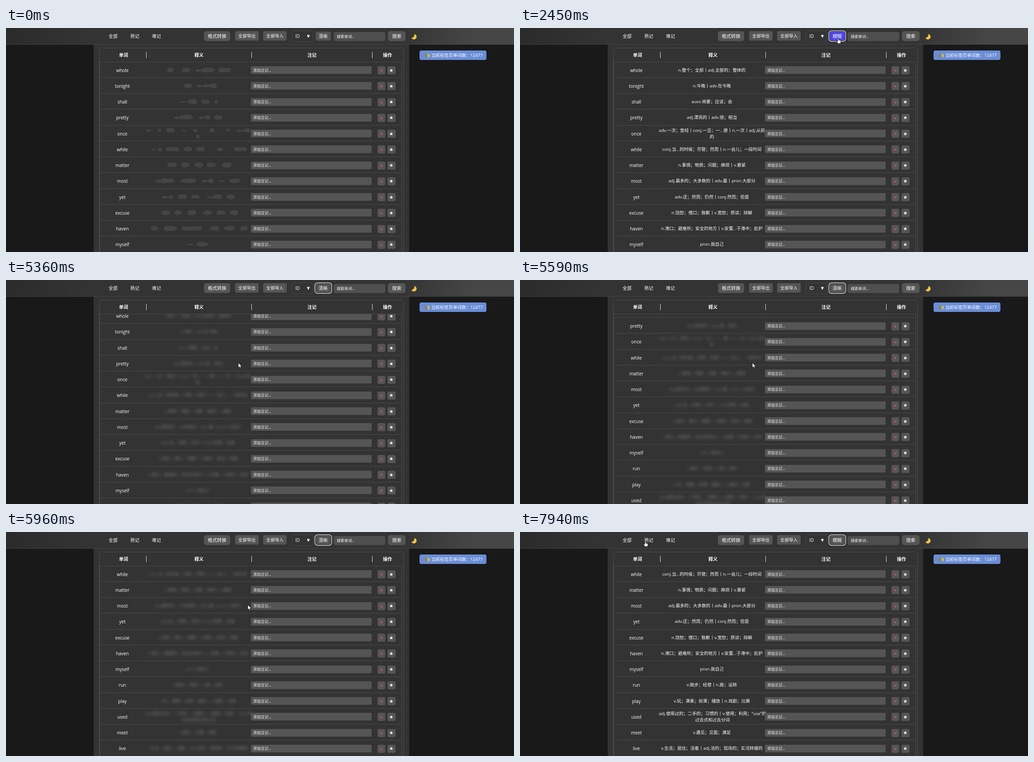
An HTML page that plays this animation: 1124x498 px, repeating every 8000 ms.

```html
<!DOCTYPE html>
<html lang="zh-CN">
<head>
<meta charset="utf-8">
<title>单词本</title>
<style>
html, body { margin: 0; width: 100%; height: 100%; overflow: hidden; background: #191919; }
#stage { position: relative; width: 1124px; height: 498px; overflow: hidden; background: #191919;
  color: #fff; font: 10px/14px "Open Sans", "Noto Sans CJK SC", "Noto Sans CJK JP", sans-serif; }
#stage div { position: absolute; box-sizing: border-box; display: grid; place-items: center; white-space: pre; }
#stage .nav { background: linear-gradient(100deg, #2b2b2b, #333 16%, #343434 78%, #464646 92%); border-bottom: 1px solid #454545; }
#stage .link { cursor: pointer; }
#stage .btn { background: #555; border-radius: 3px; cursor: pointer; }
#stage .big { border-radius: 5px; font-size: 10.3px; }
#stage .small { font-size: 9.6px; }
#stage .select { border: 1px solid #474747; border-radius: 3px; }
#stage .input { background: #555; border-radius: 2px; font-size: 8.3px; justify-items: start; padding-left: 5.5px; cursor: text; }
#stage .search { background: #4f4f4f; border-radius: 4px; padding-left: 7px; }
#stage .th { font-weight: bold; }
#stage .sep { background: #ddd; }
#stage .frame { border: 1px solid #4c4c4c; border-radius: 6px 6px 0 0; }
#stage .list { overflow: hidden; border: solid #4c4c4c; border-width: 1px 1px 0; }
#stage .row { border-bottom: 1px solid #4a4a4a; }
#stage .word { font-size: 9.9px; }
#stage .def { font-size: 9.6px; text-align: center; }
.def span { padding: 3px 0; cursor: pointer; filter: var(--veil); }
#stage .del { color: #f4547c; font-size: 12px; line-height: 20px; }
#stage .star { font: 11px/17px "DejaVu Sans", sans-serif; }
#stage .badge { background: #6a8ed6; border-radius: 4px; }
#stage .tip { background: #2b2b2b; border: 1px solid #555; border-radius: 2px; font-size: 8.2px; line-height: 12px; pointer-events: none; }
#stage .toggle { border-radius: 4px; }
#stage .toggle.focus { box-shadow: 0 0 0 1px #222, 0 0 0 2.2px #f4f4f4; }
#stage .toggle.hover { background: #5048e5; }
svg { position: absolute; left: 0; top: 0; pointer-events: none; }
</style>
</head>
<body>
<div id="stage"></div>
<svg width="1124" height="498">
  <defs>
    <filter id="flat" x="-20%" y="-60%" width="140%" height="220%" color-interpolation-filters="sRGB">
      <feGaussianBlur stdDeviation="3.6"/>
      <feComponentTransfer><feFuncA type="discrete" tableValues="0 0 0 .083 .083 .083 .083 .083 .083 .083 .083 .083 .083 .083 .083 .083 .083 .083 .083 .083"/></feComponentTransfer>
    </filter>
    <filter id="bands" x="-20%" y="-60%" width="140%" height="220%" color-interpolation-filters="sRGB">
      <feGaussianBlur stdDeviation="3.6"/>
      <feComponentTransfer><feFuncA type="discrete" tableValues="0 .02 .035 .055 .075 .095 .1 .1 .1 .1 .1 .1 .1 .1 .1 .1 .1 .1 .1 .1"/></feComponentTransfer>
    </filter>
  </defs>
  <path fill="#fcc63c" d="M903.5 13.5a6 6 0 1 1 -6.5 8.5a7 7 0 0 0 6.5 -8.5z"/>
  <g transform="rotate(-6 932 61)">
    <path fill="#d9534f" d="M927.5 57h3v8h-3z"/>
    <path fill="#5fb878" d="M930.5 56h3.5v9h-3.5z"/>
    <path fill="#e8c468" d="M934 58h3v7h-3z"/>
  </g>
  <g id="cursor" stroke-linejoin="round">
    <path id="default" fill="#fff" stroke="#000" stroke-width=".8" d="M0 0V11L2.6 8.7 4.3 12.4 6 11.7 4.4 8H7.8Z"/>
    <path id="pointer" fill="#fff" stroke="#000" stroke-width=".8" d="M-1 .5Q.1 -1 1.2 .5V4.6L5 5.6Q6.2 6.2 6.1 8L5.2 12.6H-.2L-3.6 8Q-4 6.4 -2.5 6.7L-1 8Z"/>
    <path id="text" fill="none" stroke="#ddd" d="M-2 -6H2M0 -6V6M-2 6H2"/>
  </g>
</svg>
<script>
const stage = document.getElementById('stage');
const cursor = document.getElementById('cursor');

function box(parent, cls, x, y, w, h, text = '') {
  const el = document.createElement('div');
  el.className = cls;
  el.style.cssText = `left:${x}px;top:${y}px;width:${w}px;height:${h}px`;
  el.textContent = text;
  return parent.appendChild(el);
}

// Page and table frame
box(stage, '', 194, 36, 698, 462).style.background = '#333';
box(stage, 'frame', 206, 44, 674, 470);
[[260, '单词'], [427, '释义'], [677, '注记'], [844, '操作']].forEach(([x, s]) => box(stage, 'th', x - 20, 53, 40, 14, s));
[309.5, 543, 810].forEach(x => box(stage, 'sep', x, 53, 1, 14));

// Top bar
box(stage, 'nav', 0, 0, 1124, 37);
[[237, '全部'], [285, '熟记'], [333, '难记']].forEach(([x, s]) => box(stage, 'link', x - 11, 8, 22, 20, s));
box(stage, 'btn big', 438, 7, 58, 22, '格式转换');
box(stage, 'btn small', 507, 7, 52, 21, '全部导出');
box(stage, 'btn small', 569, 7, 52, 21, '全部导入');
box(stage, 'select', 632, 6, 48, 25);
box(stage, '', 639, 11, 12, 14, 'ID');
box(stage, 'star', 663, 10, 12, 14, '▼').style.fontSize = '8.5px';
const toggle = box(stage, 'btn toggle', 685, 7.5, 33.5, 20.5);
box(stage, 'input search', 725, 9, 114, 20, '搜索单词...');
box(stage, 'btn big', 845, 7, 39, 22, '搜索');

box(stage, 'badge', 915, 50, 148, 21);
box(stage, 'small', 941, 53.5, 112, 14, '当前标签页单词数：12477');

// Word list
const words = [
  ['whole', 'n.整个；全部丨adj.全部的；整体的'],
  ['tonight', 'n.今晚丨adv.在今晚'],
  ['shall', 'auxv.将要；应该；会'],
  ['pretty', 'adj.漂亮的丨adv.很；相当'],
  ['once', 'adv.一次；曾经丨conj.一旦；一...便丨n.一次丨adj.从前\n的'],
  ['while', 'conj.当...的时候；尽管；然而丨n.一会儿；一段时间'],
  ['matter', 'n.事情；物质；问题；麻烦丨v.要紧'],
  ['most', 'adj.最多的；大多数的丨adv.最丨pron.大部分'],
  ['yet', 'adv.还；然而；仍然丨conj.然而；但是'],
  ['excuse', 'n.饶恕；借口；致歉丨v.宽恕；原谅；辩解'],
  ['haven', 'n.港口；避难所；安全的地方丨v.安置...于港中；庇护'],
  ['myself', 'pron.我自己'],
  ['run', 'v.跑步；经营丨n.跑；运转'],
  ['play', 'v.玩；演奏；扮演；播放丨n.戏剧；比赛'],
  ['used', 'adj.使用过的；二手的；习惯的丨v.使用；利用；“use”的\n过去式和过去分词'],
  ['meet', 'v.遇见；见面；满足'],
  ['live', 'v.生活；居住；活着丨adj.活的；现场的；实况转播的']
];
const PITCH = 35.25;
const list = box(stage, 'list', 207, 74.5, 669, 424);
const rows = box(list, '', 0, 0, 667, PITCH * words.length);
words.forEach(([word, def], i) => {
  const row = box(rows, 'row', 0, i * PITCH, 667, PITCH);
  box(row, 'word', 0, 11, 99, 14, word);
  const cell = box(row, 'def', 99, 0, 235, 36);
  cell.appendChild(document.createElement('span')).textContent = def;
  box(row, 'input', 333.5, 9.5, 267, 17, '添加注记...');
  box(row, 'btn del', 614, 9.5, 17, 18, '×');
  box(row, 'btn star', 635.5, 9.5, 18, 18, '★');
});

const tip = box(stage, 'tip', 709, 32, 52, 15, '切换清晰度');

// Keys: time, then values; linear in between
const path = [
  [410, 817, 472], [600, 800, 400], [900, 752, 190], [1150, 727, 77], [1250, 727, 77],
  [1650, 713, 40], [2000, 704, 22], [4290, 704, 22], [4450, 600, 160], [4700, 354, 428],
  [5020, 468, 250], [5300, 514, 184], [5910, 514, 184], [5960, 535, 162], [6050, 535, 162],
  [6350, 670, 50], [6510, 704, 22], [7560, 704, 22], [7680, 600, 45], [7820, 340, 44],
  [7890, 265, 30], [7940, 277, 20]
];
const scroll = [[5310, 0], [5360, 13.5], [5440, 13.5], [5500, 45], [5680, 148], [5720, 148], [5830, 170], [5930, 5 * PITCH]];

function sample(keys, t) {
  const i = keys.findIndex(k => k[0] > t);
  if (i < 0) return keys[keys.length - 1].slice(1);
  if (!i) return keys[0].slice(1);
  const a = keys[i - 1], b = keys[i], p = (t - a[0]) / (b[0] - a[0]);
  return a.slice(1).map((v, j) => v + (b[j + 1] - v) * p);
}

function veil(t) {
  const reveal = p => `blur(${3.6 * (1 - p)}px) opacity(${.35 + .65 * p})`;
  if (t < 2200) return 'url(#flat)';
  if (t < 2450) return reveal((t - 2200) / 250);
  if (t < 3910) return 'none';
  if (t < 5120) return 'blur(1.8px) opacity(.5)';
  if (t < 6770) return 'url(#bands)';
  if (t < 7020) return reveal((t - 6770) / 250);
  return 'none';
}

function draw(now) {
  const t = now % 8000;
  const [x, y] = sample(path, t);
  rows.style.top = -sample(scroll, t)[0] + 'px';
  list.style.setProperty('--veil', veil(t));

  const clear = t >= 2200 && t < 3910 || t >= 6770;
  toggle.textContent = clear ? '模糊' : '清晰';
  toggle.classList.toggle('focus', t >= 2200);
  tip.style.opacity = t < 2910 || t >= 3660 ? 0 : Math.min(1, .5 + (t - 2910) / 200);

  // The cursor's shape follows whatever lies beneath it
  const under = t >= 410 && document.elementFromPoint(x, y);
  toggle.classList.toggle('hover', under === toggle);
  const style = under ? getComputedStyle(under).cursor : 'default';
  const kind = style === 'auto' ? 'default' : style;
  for (const shape of cursor.children) shape.style.display = shape.id === kind ? '' : 'none';
  cursor.style.display = t < 410 ? 'none' : '';
  cursor.setAttribute('transform', `translate(${x} ${y})`);
  requestAnimationFrame(draw);
}
requestAnimationFrame(draw);
</script>
</body>
</html>
```
